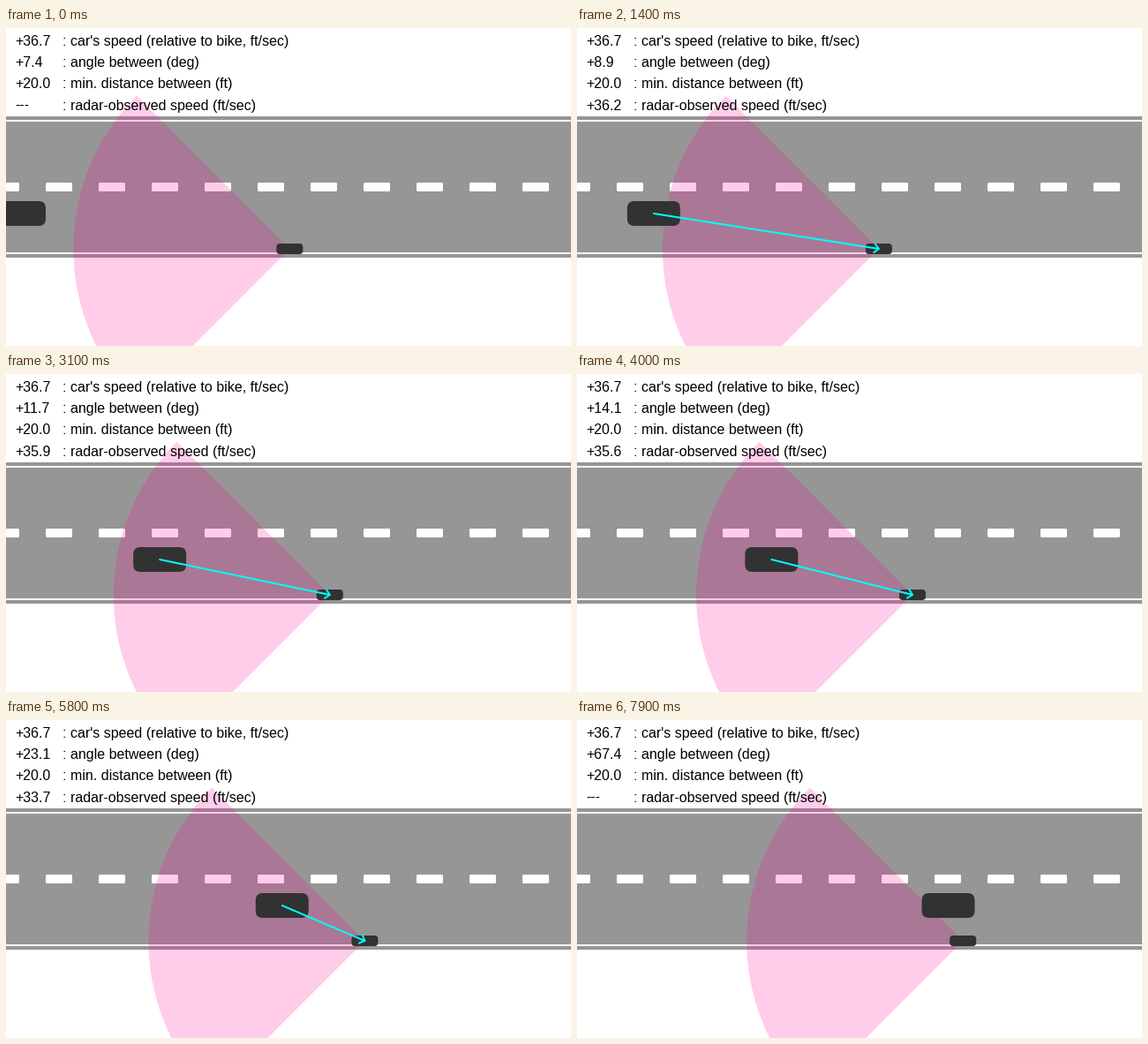
These frames come from a looping animation (640x360 px, 8000 ms). A matplotlib script:

```python
import math

import matplotlib.pyplot as plt
from matplotlib.animation import FuncAnimation
from matplotlib.patches import FancyBboxPatch, Rectangle, Wedge

W, H, DPI = 640, 360, 80
PX = 72 / DPI  # points per pixel
FRAMES, INTERVAL = 80, 100

CAR_X, CAR_Y, CAR_LEN = 15.0, 210, 60
BIKE_X, BIKE_Y = 321.33, 250
CAR_V, BIKE_V = 77 / 1.5, 22 / 1.5  # ft/sec, one pixel per foot
REL_V = CAR_V - BIKE_V
RADAR_R, RADAR_HALF = 245, 45
HEAD = 5

ASPHALT, DARK, PINK = "#969696", "#323232", "#ff0096"

plt.rcParams["font.family"] = "Liberation Sans"
fig = plt.figure(figsize=(W / DPI, H / DPI), dpi=DPI, facecolor="white")
ax = fig.add_axes([0, 0, 1, 1])
ax.set(xlim=(0, W), ylim=(H, 0))
ax.axis("off")


def bar(y, h, color):
    ax.add_patch(Rectangle((0, y), W, h, fc=color, lw=0, zorder=1))


def rounded(cx, cy, w, h, r, color, z):
    box = FancyBboxPatch((cx - w / 2, cy - h / 2), w, h, fc=color, lw=0, zorder=z,
                         boxstyle=f"round,pad=0,rounding_size={r}", snap=False)
    return ax.add_patch(box)


def label(x, y, text):
    return ax.text(x, y, text, fontsize=16 * PX, color="black", va="baseline", zorder=6)


def stroke():
    return ax.plot([], [], color="cyan", lw=2 * PX, solid_capstyle="round",
                   solid_joinstyle="round", zorder=5)[0]


bar(100, 160, ASPHALT)
bar(104, 2, "white")
bar(254, 2, "white")
for x in range(0, W, 60):
    rounded(x, 180, 30, 10, 1.5, "white", 2)

radar = ax.add_patch(Wedge((BIKE_X, BIKE_Y), RADAR_R, 180 - RADAR_HALF, 180 + RADAR_HALF,
                           fc=PINK, alpha=0.2, lw=0, zorder=3))
car = rounded(CAR_X, CAR_Y, CAR_LEN, 28, 8, DARK, 4)
bike = rounded(BIKE_X, BIKE_Y, 30, 12, 4, DARK, 4)
shaft, head = stroke(), stroke()

captions = ["car's speed (relative to bike, ft/sec)", "angle between (deg)",
            "min. distance between (ft)", "radar-observed speed (ft/sec)"]
values = []
for y, caption in zip((20, 44, 68, 93), captions):
    values.append(label(10, y, ""))
    label(64.5, y, ": " + caption)


def update(i):
    t = i * INTERVAL / 1000
    cx, bx = CAR_X + CAR_V * t, BIKE_X + BIKE_V * t
    gap = bx - cx
    angle = math.atan2(BIKE_Y - CAR_Y, gap)
    seen = gap - CAR_LEN / 2 < RADAR_R and math.degrees(angle) < RADAR_HALF

    car.set_x(cx - CAR_LEN / 2)
    bike.set_x(bx - 15)
    radar.set_center((bx, BIKE_Y))

    shaft.set_data([cx, bx], [CAR_Y, BIKE_Y])
    size = HEAD * math.sqrt(2)
    barbs = [(bx - size * math.cos(angle + s), BIKE_Y - size * math.sin(angle + s))
             for s in (math.pi / 4, -math.pi / 4)]
    head.set_data(*zip(barbs[0], (bx, BIKE_Y), barbs[1]))
    shaft.set_visible(seen)
    head.set_visible(seen)

    numbers = [REL_V, math.degrees(angle), (BIKE_Y - CAR_Y) / 2, REL_V * math.cos(angle)]
    for text, n in zip(values, numbers):
        text.set_text(f"{n:+.1f}")
    if not seen:
        values[3].set_text("---")
    return car, bike, radar, shaft, head, *values


anim = FuncAnimation(fig, update, frames=FRAMES, interval=INTERVAL,
                     init_func=lambda: update(0), repeat=True, repeat_delay=0)
plt.show()
```
